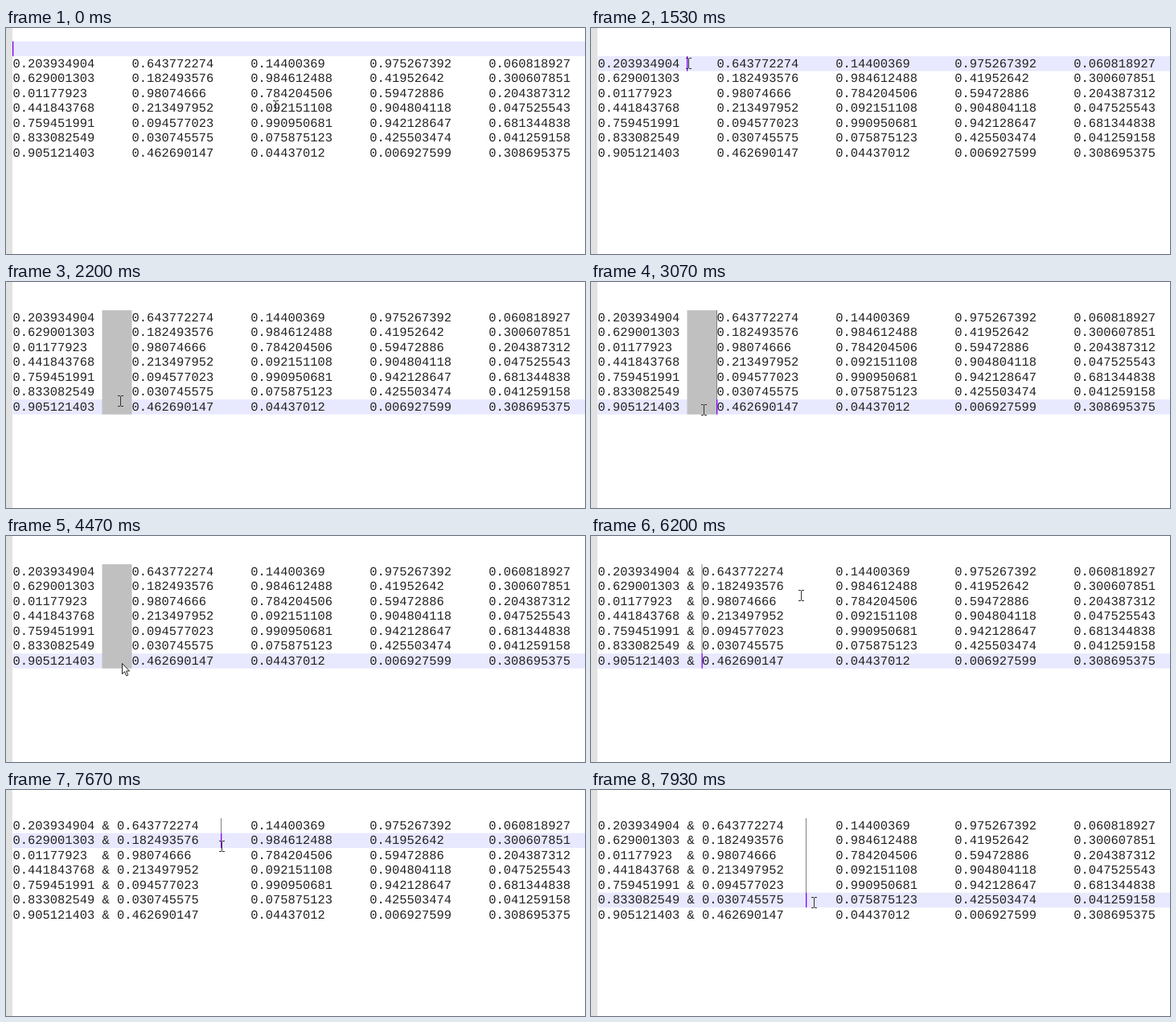
Animation of 720x281 px, one loop 8000 ms. Source, as an HTML page:

```html
<!DOCTYPE html>
<html lang="en">
<head>
<meta charset="utf-8">
<title>Column editing</title>
<style>
html, body { margin: 0; width: 100%; height: 100%; overflow: hidden; background: #fff; }
svg { display: block; width: 720px; height: 281px; }
text {
  font-family: "Liberation Mono", monospace;
  font-size: 15.414px;
  fill: #222;
  white-space: pre;
  text-rendering: geometricPrecision;
}
</style>
</head>
<body>
<svg viewBox="0 0 720 281">
  <rect width="720" height="281" fill="#fff"/>
  <rect width="8" height="281" fill="#e2e2e2"/>
  <rect id="line" x="8.5" width="711.5" height="18.5" fill="#e8e8ff"/>
  <rect id="sel" fill="#c0c0c0"/>
  <g id="rows"></g>
  <rect id="extra" width="1" fill="#7f7f7f"/>
  <rect id="caret" width="1.3" height="18.5" fill="#8000ff"/>
  <path id="beam" d="M-3 -6.5H0M1 -6.5H4M-3 6.5H0M1 6.5H4M.5 -6V6" fill="none" stroke="#333"/>
  <path id="arrow" d="M.5 .5V13.5L3.5 10.7L5.7 15.8L7.8 14.9L5.6 9.9H9.6Z" fill="#fff" stroke="#222"/>
</svg>
<script>
const LOOP = 8000, TICK = 1000 / 15, BLINK = 605;
const LEFT = 8.5, CHAR = 9.25, TOP = 16.6, ROW = 18.5, TAB = 4;

const table = `0.203934904 0.643772274 0.14400369 0.975267392 0.060818927
0.629001303 0.182493576 0.984612488 0.41952642 0.300607851
0.01177923 0.98074666 0.784204506 0.59472886 0.204387312
0.441843768 0.213497952 0.092151108 0.904804118 0.047525543
0.759451991 0.094577023 0.990950681 0.942128647 0.681344838
0.833082549 0.030745575 0.075875123 0.425503474 0.041259158
0.905121403 0.462690147 0.04437012 0.006927599 0.308695375`
  .split("\n").map(r => r.split(" "));

// key points of the pointer: time, x, y
const path = [
  [0, 335, 97], [400, 124, 46], [1530, 121, 43], [2200, 142, 148],
  [2530, 133, 162], [2800, 133, 162], [3200, 144, 158], [5730, 144, 158],
  [6200, 261, 74], [6800, 268, 37], [7530, 267, 42], [7670, 268, 71], [8000, 279, 157]
];

// moments that restart the caret blink
const wakes = [0, 190, 1530, 2590, 5330, 5730, 7060, 7530];

const $ = id => document.getElementById(id);
const set = (id, attrs) => {
  for (const k in attrs) $(id).setAttribute(k, attrs[k]);
};
const rowY = r => TOP + r * ROW;
const colX = c => LEFT + c * CHAR;

const lines = table.map((_, i) => {
  const el = document.createElementNS("http://www.w3.org/2000/svg", "text");
  el.setAttribute("x", LEFT);
  el.setAttribute("y", Math.floor(rowY(i + 1) + 14));
  $("rows").append(el);
  return el;
});

function expand(s) {
  let out = "";
  for (const ch of s) out += ch === "\t" ? "\u00a0".repeat(TAB - out.length % TAB) : ch;
  return out.replace(/ /g, "\u00a0");
}

let shown = null;
function write(insert) {
  if (insert === shown) return;
  shown = insert;
  table.forEach(([first, ...rest], i) => {
    lines[i].textContent = expand(first + "\t" + insert + rest.join("\t\t"));
  });
}

function pointer(t) {
  const i = Math.max(1, path.findIndex(p => p[0] >= t));
  const [t0, x0, y0] = path[i - 1], [t1, x1, y1] = path[i];
  const k = (t - t0) / (t1 - t0);
  return [x0 + (x1 - x0) * k, y0 + (y1 - y0) * k];
}

function caretOn(t) {
  const last = wakes.filter(w => w <= t + 5).pop();
  return Math.floor((t - last) / BLINK) % 2 ? 0 : 1;
}

function state(t, x, y) {
  const under = Math.min(7, Math.max(1, Math.floor((y - TOP) / ROW)));
  if (t < 395) return { row: 0, col: 0 };
  if (t < 1595) return { row: 1, col: 12 };
  if (t < 5325) return { row: under, col: x > colX(14) ? 16 : 12, from: 12 };
  if (t < 5725) return { row: 7, col: 13 };
  if (t < 7055) return { row: 7, col: 14 };
  return { row: t < 7525 ? 1 : under, col: 28 };
}

function draw(time) {
  const t = Math.floor((time % LOOP) / TICK + 0.1) * TICK % LOOP;
  const [x, y] = pointer(t);
  const { row, col, from = col } = state(t, x, y);
  const opacity = caretOn(t);
  const arrow = t > 3395 && t < 5765;
  const transform = `translate(${Math.round(x)} ${Math.round(y)})`;

  write(t < 5325 ? "\t" : t < 5725 ? "&" : "& ");
  set("line", { y: rowY(row) });
  set("sel", { x: colX(from), y: rowY(1), width: (col - from) * CHAR, height: row * ROW });
  set("extra", { x: colX(col) - 0.5, y: rowY(1), height: Math.max(0, row - 1) * ROW, opacity });
  set("caret", { x: colX(col) - 0.5, y: rowY(row), opacity });
  set("beam", { transform, opacity: arrow ? 0 : 1 });
  set("arrow", { transform, opacity: arrow ? 1 : 0 });
}

const start = performance.now();
function loop() {
  draw(performance.now() - start);
  requestAnimationFrame(loop);
}
loop();
</script>
</body>
</html>
```
